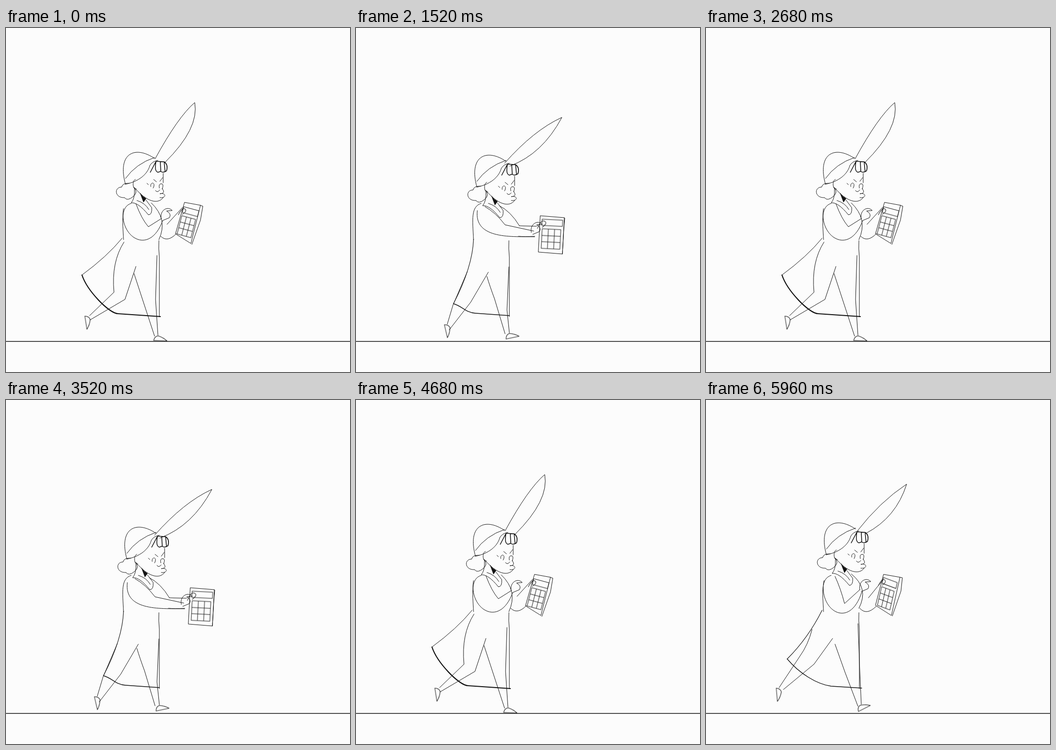
An HTML page without scripts that plays this animation: 720 px wide and 720 px high, repeating every 6 s.

```html
<!DOCTYPE html>
<html lang="en">
<head>
<meta charset="utf-8">
<title>Walk cycle</title>
<style>
html, body { margin: 0; width: 100%; height: 100%; overflow: hidden; background: #fcfcfc; }
svg { display: block; width: 100vw; height: 100vh; fill: none; stroke: #111; stroke-linecap: round; stroke-linejoin: round; }
path { vector-effect: non-scaling-stroke; }
.solid { fill: #111; }
.bold { stroke-width: 1.6; }

/* 16 drawings at 24 per second */
[style] { animation: calc(6s / 9) steps(4) -1ms infinite; }

/* Key drawings: landing, reach, passing, heel strike */
@keyframes ear {
  0%, 100% { d: path("M312 274Q360 186 395 156Q405 210 333 281"); animation-timing-function: steps(1) }
  6.25% { d: path("M311 274Q356 186 389 152Q403 208 332 280"); animation-timing-function: steps(3) }
  25% { d: path("M311 283Q372 214 431 187Q390 264 322 289"); animation-timing-function: steps(7) }
  68.75% { d: path("M316 275Q382 214 406 161Q416 236 334 278") }
  93.75%, 99.99% { d: path("M316 275Q364 213 420 176Q398 246 335 279") }
}
@keyframes head {
  0%, 100% { transform: translate(0, 0) }
  25% { transform: translate(3px, 6px); animation-timing-function: steps(7) }
  68.75% { transform: translate(1px, 2px) }
  93.75%, 99.99% { transform: translate(2px, -3px) }
}
@keyframes chest {
  0%, 100% { d: path("M304 366Q340 400 320 443") }
  25% { d: path("M300 372Q324 384 342 414"); animation-timing-function: steps(7) }
  68.75% { d: path("M306 371Q343 405 320 443") }
  93.75%, 99.99% { d: path("M304 364Q342 394 320 436") }
}
@keyframes skirt {
  0%, 100% { d: path("M243 440Q212 478 159 517") }
  25% { d: path("M246 442Q244 500 204 577"); animation-timing-function: steps(7) }
  68.75% { d: path("M247 446Q217 478 262 599"); stroke-width: 1.5 }
  93.75%, 99.99% { d: path("M243 440Q214 498 170 542") }
}
@keyframes hem {
  0%, 100% { d: path("M159 517C170 550 216 598 235 598L323 604"); stroke-width: 2.2 }
  25% { d: path("M204 577C222 582 230 596 250 597L321 602"); stroke-width: 1.4; animation-timing-function: steps(7) }
  68.75% { d: path("M262 599C275 605 285 606 295 605L320 602"); stroke-width: 1.8 }
  93.75%, 99.99% { d: path("M170 542C195 572 232 595 262 599L326 603"); stroke-width: 1.4 }
}
@keyframes legOne {
  0%, 100% { d: path("M268 514L287 572L311 645M316 476L313 568L318 643") }
  25% { d: path("M233 510L203 580L191 620M277 511L240 574L195 632"); animation-timing-function: steps(7) }
  68.75% { d: path("M254 502L264 560L258 628M256 516L278 574L268 634") }
  93.75%, 99.99% { d: path("M270 511L291 570L318 641M318 468L322 570L325 637") }
}
@keyframes legTwo {
  0%, 100% { d: path("M247 448Q220 490 226 553L175 602M272 499L249 568L176 611") }
  25% { d: path("M274 520Q280 540 290 567L312 640M320 500L316 590L321 638"); animation-timing-function: steps(7) }
  68.75% { d: path("M278 574Q274 590 273 606L277 648M298 509L312 584L290 649") }
  93.75%, 99.99% { d: path("M222 480Q214 512 196 537L153 602M265 499L226 553L162 606") }
}
@keyframes footOne {
  0%, 100% { transform: translate(309px, 654px) rotate(2deg) }
  25% { transform: translate(185px, 621px) rotate(77deg); animation-timing-function: steps(7) }
  68.75% { transform: translate(253px, 631px) rotate(52deg) }
  93.75%, 99.99% { transform: translate(319px, 652px) rotate(-27deg) }
}
@keyframes footTwo {
  0%, 100% { transform: translate(165px, 603px) rotate(81deg) }
  25% { transform: translate(314px, 651px) rotate(-12deg); animation-timing-function: steps(7) }
  68.75% { transform: translate(275px, 654px) rotate(2deg) }
  93.75%, 99.99% { transform: translate(147px, 603px) rotate(85deg) }
}
@keyframes nearArm {
  0%, 100% { d: path("M246 378C235 436 300 480 328 403M272 368Q284 400 298 416L325 399") }
  25% { d: path("M254 382C246 444 330 436 374 437M270 374Q292 386 312 412L372 425"); animation-timing-function: steps(7) }
  68.75% { d: path("M258 404C254 455 284 468 284 432M272 374Q282 394 282 400L284 432") }
  93.75%, 99.99% { d: path("M247 378C234 438 300 484 326 402M270 369Q282 395 290 426L322 397") }
}
@keyframes hand {
  0%, 100% { transform: translate(325px, 399px) }
  25% { transform: translate(367px, 428px); animation-timing-function: steps(7) }
  68.75% { transform: translate(257px, 405px) }
  93.75%, 99.99% { transform: translate(322px, 397px) }
}
@keyframes farArm {
  0%, 100% { d: path("M337 411L369 376M324 436Q338 450 357 430") }
  25% { d: path("M342 414L378 415M340 436Q352 437 374 436"); animation-timing-function: steps(7) }
  68.75% { d: path("M337 415L366 374M322 443Q336 458 352 444") }
  93.75%, 99.99% { d: path("M340 414L370 377M322 436Q336 452 356 432") }
}
@keyframes shell {
  0%, 100% { d: path("M374 365L407 371L387 451L355 431ZM407 371L412 373L407 402L389 453") }
  25% { d: path("M386 393L436 397L432 473L382 469ZM436 397L437 398L435 420L432 473"); animation-timing-function: steps(7) }
  68.75% { d: path("M366 371L405 378L389 455L352 436ZM405 378L407 380L401 408L390 456") }
  93.75%, 99.99% { d: path("M372 365L406 371L388 451L355 430ZM406 371L411 372L408 400L390 452") }
}
@keyframes keys {
  0%, 100% { transform: matrix(.74, .2, -.24, .93, 371.5, 367) }
  25% { transform: matrix(1, .05, -.05, 1, 387, 393); animation-timing-function: steps(7) }
  68.75% { transform: matrix(.74, .2, -.22, 1, 369, 368) }
  93.75%, 99.99% { transform: matrix(.67, .25, -.22, .95, 371, 364) }
}
@keyframes reach {
  0%, 25% { transform: none; animation-timing-function: steps(1) }
  31.25% { transform: translate(13px, 0); animation-timing-function: steps(6) }
  68.75%, 100% { transform: none }
}
</style>
</head>
<body>
<svg viewBox="0 0 720 720">
  <defs><path id="shoe" d="M0 0Q2-9 9-10Q20-7 28 0Z"/></defs>
  <path class="bold" d="M0 656H720"/>
  <path style="animation-name:legTwo"/>
  <path style="animation-name:legOne"/>
  <use href="#shoe" style="animation-name:footTwo"/>
  <use href="#shoe" style="animation-name:footOne"/>
  <path style="animation-name:skirt"/>
  <path style="animation-name:hem"/>
  <path d="M262 367C240 374 244 400 246 443M320 445Q319 462 321 480V604"/>
  <path style="animation-name:chest"/>
  <path style="animation-name:ear"/>
  <g style="animation-name:head">
    <path d="M250 327C232 262 270 245 311 273M250 315Q272 284 311 271M250 327C285 320 298 300 301 288Q306 279 318 277"/>
    <path d="M258 325Q244 324 242 333C226 333 227 356 248 355Q254 363 266 353T267 333"/>
    <path class="bold" d="M302 302L314 279Q310 300 318 302L324 300L323 280M324 300Q328 304 336 299Q340 286 331 280L314 279M331 280L333 301"/>
    <path d="M329 304V324M327 336C333 345 329 346 322 347C336 344 336 357 322 355M329 355C318 370 294 364 269 334M271 317C264 317 264 340 273 337"/>
    <path d="M303 332C301 321 315 322 308 335M321 335Q319 326 325 326T327 337M309 317l6 5M322 321l6-8M295 325l3 3M313 340Q316 346 322 339"/>
    <path class="solid" d="M281 346Q284 352 293 357L288 364Z"/>
    <path d="M269 336Q270 357 262 366Q276 364 298 391Q306 391 305 376L293 360M274 361Q291 366 299 380"/>
  </g>
  <g style="animation-name:reach">
    <path style="animation-name:shell"/>
    <path style="animation-name:farArm"/>
    <path style="animation-name:keys" d="M3 7h43v13h-43zM4 27h39v41h-39zM17 27v41M30 27v41M4 41h39M4 54h39M-6 27Q0 8 8 11T4 24"/>
  </g>
  <path style="animation-name:nearArm"/>
  <path style="animation-name:hand" d="M0 0C-4-16 12-28 23-17L11-16Q22-10 17-2L3 4"/>
</svg>
</body>
</html>
```
